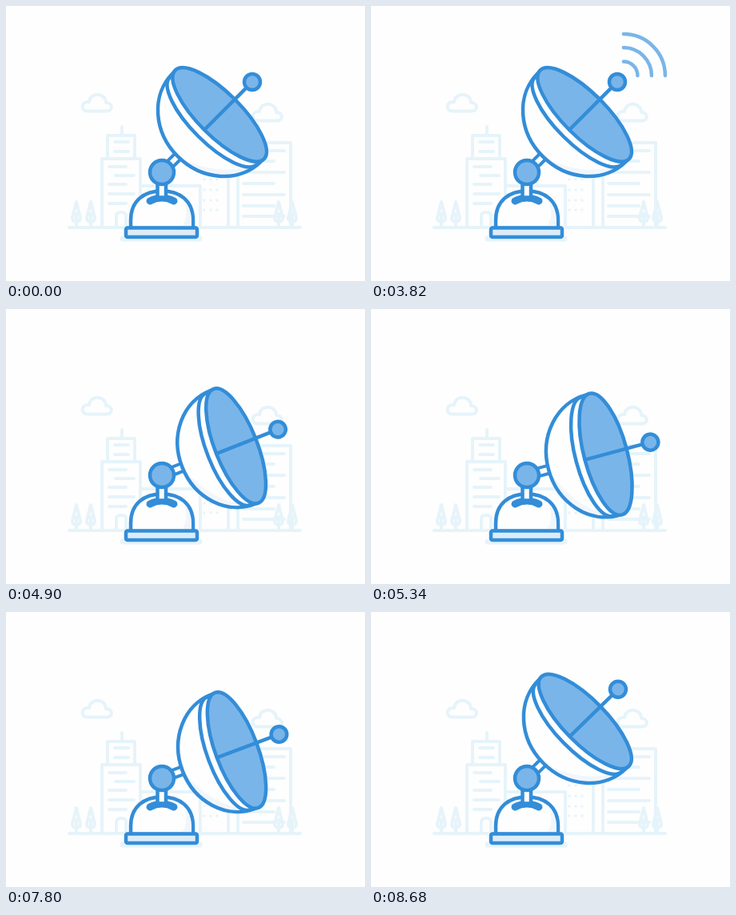
These frames come from a looping animation (449 by 344 pixels, 8.7 s). An HTML page:

```html
<!DOCTYPE html>
<html lang="en">
<head>
<meta charset="utf-8">
<title>Satellite dish</title>
<style>
  html, body { margin: 0; width: 100%; height: 100%; overflow: hidden; background: #fefefe; }
  svg { display: block; width: 449px; height: 344px; }
  g { stroke-linecap: round; stroke-linejoin: round; }
  #city { fill: none; stroke: #e6f4fa; stroke-width: 4; }
  #base, #dish { fill: #fefefe; stroke: #338dd8; stroke-width: 4.5; }
  #dish * { vector-effect: non-scaling-stroke; }
  .blue { fill: #7ab5e9; }
  .none { fill: none; }
  .shade { fill: #f1f6fc; stroke: none; }
</style>
</head>
<body>
<svg viewBox="0 0 449 344">
  <defs>
    <path id="cloud" d="M102 131.500H126C134 131.500 134 121 125 121C125 108 105 107 104 120C93 119 93 131.500 102 131.500Z"/>
    <path id="tree" d="M0 245L-5 265Q-5 270 0 270Q5 270 5 265ZM0 260V277"/>
  </defs>

  <g id="city">
    <path d="M79 277H368"/>
    <path d="M145 151V162M127 191V162H161V191M120 277V191H168V277M138 277V262Q138 258 144 258Q150 258 150 262V277"/>
    <path d="M136 170H153M136 182H153M129 201H150M137 212H160M129 223H150M129 235H160M129 247H150"/>
    <path d="M168 225H243V277M278 277V190M290 277V171H356V277"/>
    <path d="M297 181H348M297 194H335M297 208H348M297 222H335M297 236H348M297 250H335M297 263H348"/>
    <path stroke-dasharray="0 8" stroke-width="3.500" d="M248 217H266M248 230H266M248 243H266M248 255H266"/>
    <use href="#cloud"/>
    <use href="#cloud" x="213" y="12"/>
    <use href="#tree" x="88"/>
    <use href="#tree" x="106"/>
    <use href="#tree" x="341"/>
    <use href="#tree" x="358"/>
    <path stroke-width="7" d="M146 291H242"/>
  </g>

  <g id="base">
    <path d="M156 278V268C156 243 173 231.500 195 231.500S234 243 234 268V278Z"/>
    <path class="shade" d="M220 276Q229 262 223 245Q232 254 232 268V276Z"/>
    <path class="none" stroke-width="9" style="stroke-width:9" d="M180 244Q195 236 210 244"/>
    <path d="M189.500 215V239.500H200V215"/>
    <rect x="150" y="277.500" width="89" height="11.500" rx="2" style="fill:#dcecf9"/>
  </g>

  <g id="dish">
    <path d="M0 -5H34V5H0Z" style="stroke-width:4"/>
    <path d="M97 -78A69 78 0 0 0 97 78Z" stroke="none"/>
    <path class="shade" d="M28 0A69 78 0 0 0 97 78Q48 62 28 0Z"/>
    <path class="none" d="M102 -78H97A69 78 0 0 0 97 78H102"/>
    <path class="none" d="M91 -77A27 77 0 0 0 91 77"/>
    <ellipse class="blue" cx="102" cy="0" rx="27" ry="78.500"/>
    <path d="M76 0H150"/>
    <circle class="blue" cx="159.800" cy="0" r="10"/>
    <g id="waves" fill="none" stroke="#7ab5e9" stroke-width="4.500"></g>
  </g>

  <circle class="blue" cx="195" cy="208" r="15" stroke="#338dd8" stroke-width="4.500"/>
</svg>
<script>
  const LOOP = 8700;
  const FADE = 200, STAGGER = 280;
  const TURN = 1400, TURN_DOWN = 3930, TURN_UP = 7410;
  const PULSES = [[360, 680], [1710, 2030], [3060, 3940]]; // first arc: fade in, fade out

  const dish = document.getElementById('dish');
  const waves = [17.5, 35, 52].map(radius => {
    const arc = document.createElementNS('http://www.w3.org/2000/svg', 'path');
    const d = radius * Math.SQRT1_2;
    arc.setAttribute('d', `M${171 + d} ${-d}A${radius} ${radius} 0 0 1 ${171 + d} ${d}`);
    document.getElementById('waves').append(arc);
    return arc;
  });

  const ramp = (t, start, length) => Math.min(1, Math.max(0, (t - start) / length));
  const smooth = x => x * x * (3 - 2 * x);
  const mix = (a, b, p) => a + (b - a) * p;

  function draw(t) {
    const tilt = smooth(ramp(t, TURN_DOWN, TURN)) - smooth(ramp(t, TURN_UP, TURN));
    // Points travel in straight lines between the two poses, so the matrices are blended.
    const cos = mix(Math.cos(Math.PI / 4), Math.cos(Math.PI / 12), tilt);
    const sin = mix(-Math.sin(Math.PI / 4), -Math.sin(Math.PI / 12), tilt);
    dish.setAttribute('transform', `matrix(${cos} ${sin} ${-sin} ${cos} 195 208)`);

    waves.forEach((arc, i) => {
      const local = t - i * STAGGER;
      const opacity = PULSES.reduce((sum, [on, off]) =>
        sum + ramp(local, on, FADE) - ramp(local, off, FADE), 0);
      arc.setAttribute('opacity', opacity);
    });
  }

  const began = performance.now();
  function tick() {
    draw((performance.now() - began) % LOOP);
    requestAnimationFrame(tick);
  }
  tick();
</script>
</body>
</html>
```
